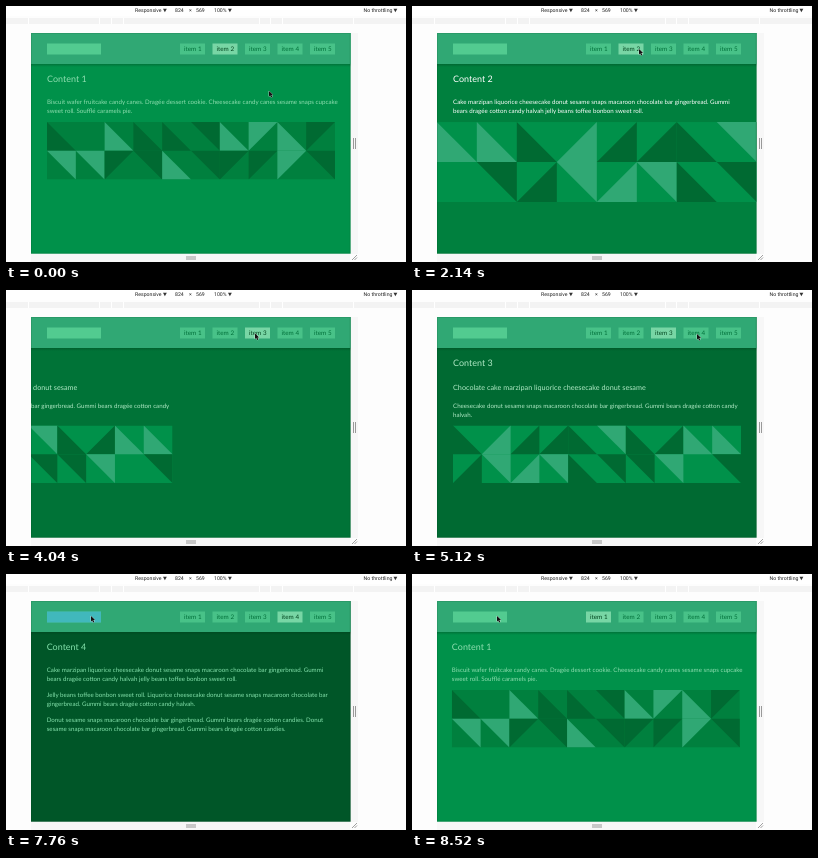
Recreate the animation shown at these times as an HTML page with a canvas. Size 400 px wide and 256 px high, loop 8.54 s.

```html
<!DOCTYPE html>
<html lang="en">
<head>
<meta charset="utf-8">
<title>Page transitions</title>
<style>
  html, body { margin: 0; width: 100%; height: 100%; overflow: hidden; background: #fff; }
  canvas { display: block; }
</style>
</head>
<body>
<canvas id="stage" width="400" height="256"></canvas>
<script>
const ctx = document.getElementById('stage').getContext('2d');
ctx.textRendering = 'geometricPrecision';
const LOOP = 8540, SLIDE = 840;
const VIEW = { x: 25, y: 27, w: 319.6, h: 220.7 };
const HEADER_H = 31, LEFT = 41, IMAGE_W = 288, IMAGE_H = 57.6;
const LIGHT = '#30a874', MID = '#00914a', BASE = '#00803e', DARK = '#006a32';

// Tiles: a-d fill the TL, TR, BR or BL corner; capitals use the light colour.
const tiles = ['cDDdCccdBd', 'B.bcBCBdbb'];
const shift = (rows, n) => rows.map(row => row.slice(n) + row.slice(0, n));
const halfTurn = rows => rows.map(row => [...row].reverse().map(code => {
  const i = 'abcdABCD'.indexOf(code);
  return i < 0 ? code : 'cdabCDAB'[i];
}).join('')).reverse();

const pages = [
  { bg: [0, 145, 74], ink: [142, 222, 176],
    lines: [[98, 'Biscuit wafer fruitcake candy canes. Dragée dessert cookie. Cheesecake candy canes sesame snaps cupcake'],
            [107, 'sweet roll. Soufflé caramels pie.']],
    image: { y: 116, base: BASE, rows: shift(halfTurn(tiles), 7) } },
  { bg: [0, 128, 62], ink: [255, 255, 255],
    lines: [[98, 'Cake marzipan liquorice cheesecake donut sesame snaps macaroon chocolate bar gingerbread. Gummi'],
            [107, 'bears dragée cotton candy halvah jelly beans toffee bonbon sweet roll.']],
    image: { y: 116, base: MID, rows: tiles } },
  { bg: [0, 106, 50], ink: [175, 233, 197],
    lines: [[99.5, 'Chocolate cake marzipan liquorice cheesecake donut sesame', 7.25],
            [118, 'Cheesecake donut sesame snaps macaroon chocolate bar gingerbread. Gummi bears dragée cotton candy'],
            [127, 'halvah.']],
    image: { y: 135.5, base: MID, rows: shift(tiles, 3) } },
  { bg: [0, 86, 40], ink: [132, 226, 172],
    lines: [[98, 'Cake marzipan liquorice cheesecake donut sesame snaps macaroon chocolate bar gingerbread. Gummi'],
            [107, 'bears dragée cotton candy halvah jelly beans toffee bonbon sweet roll.'],
            [123, 'Jelly beans toffee bonbon sweet roll. Liquorice cheesecake donut sesame snaps macaroon chocolate bar'],
            [132, 'gingerbread. Gummi bears dragée cotton candy halvah.'],
            [148, 'Donut sesame snaps macaroon chocolate bar gingerbread. Gummi bears dragée cotton candies. Donut'],
            [157, 'sesame snaps macaroon chocolate bar gingerbread. Gummi bears dragée cotton candies.']] }
];
const clicks = [
  { at: 500, from: 0, to: 1 },
  { at: 3580, from: 1, to: 2, tap: [239, 25] },
  { at: 5620, from: 2, to: 3, tap: [271.5, 25] },
  { at: 7760, from: 3, to: 0, tap: [41, 54] }
];
const moves = [
  [500, 800, 227, 43], [2220, 2580, 249, 43.5], [4920, 5120, 285, 44], [6480, 6760, 85, 42]
];

const clamp = v => Math.max(0, Math.min(1, v));
const mix = (a, b, k) => a + (b - a) * k;
const mixColor = (a, b, k) => `rgb(${a.map((v, i) => Math.round(mix(v, b[i], k)))})`;
const smooth = k => k * k * (3 - 2 * k);
const expoOut = k => k >= 1 ? 1 : 1 - 2 ** (-10 * k);
const expoIn = k => k <= 0 ? 0 : 2 ** (10 * k - 10);
const expoInOut = k => k < .5 ? expoIn(2 * k) / 2 : (1 + expoOut(2 * k - 1)) / 2;

function rect(x, y, w, h, color) {
  ctx.fillStyle = color;
  ctx.fillRect(x, y, w, h);
}

function poly(color, ...points) {
  ctx.fillStyle = color;
  ctx.beginPath();
  points.forEach(([x, y]) => ctx.lineTo(x, y));
  ctx.closePath();
  ctx.fill();
}

// Text is set large and scaled down so that small sizes keep true widths.
function text(str, x, y, size, color, font = 'Lato') {
  ctx.save();
  ctx.translate(x, y);
  ctx.scale(.1, .1);
  ctx.font = `${size * 10}px ${font}, sans-serif`;
  ctx.fillStyle = color;
  ctx.fillText(str, 0, 0);
  ctx.restore();
}

function drawToolbar() {
  rect(0, 0, 400, 256, '#fdfdfd');
  rect(0, 0, 400, 10, '#fff');
  [['Responsive', 129], ['824', 169], ['×', 183], ['569', 190], ['100%', 208], ['No throttling', 357.5]]
    .forEach(([label, x]) => text(label, x, 6.3, 5.2, '#222', 'Roboto'));
  [157, 222, 387.5].forEach(x => poly('#333', [x, 2.8], [x + 3.8, 2.8], [x + 1.9, 6.2]));
  rect(0, 12, 400, 6, '#f3f3f3');
  [22, 93, 105, 117, 253, 264, 276, 347].forEach(x => rect(x, 12, 1, 6, '#fff'));
}

function drawHandles() {
  rect(344.5, 27, 7.5, 221, '#f7f7f7');
  rect(25, 248, 319, 8, '#f7f7f7');
  [347, 349].forEach(x => rect(x, 132, 1, 11, '#999'));
  [250.5, 252.5].forEach(y => rect(180, y, 10, 1, '#999'));
  ctx.strokeStyle = '#777';
  ctx.lineWidth = .7;
  ctx.beginPath();
  ctx.moveTo(346, 254); ctx.lineTo(351, 249);
  ctx.moveTo(348.5, 254); ctx.lineTo(351, 251.5);
  ctx.stroke();
}

function drawImage({ base, rows }, x, y, w, h) {
  const tile = Math.max(w / 10, h / 2);
  ctx.save();
  ctx.beginPath();
  ctx.rect(x, y, w, h);
  ctx.clip();
  rect(x, y, w, h, base);
  ctx.translate(x + w / 2 - 5 * tile, y + h / 2 - tile);
  rows.forEach((row, r) => [...row].forEach((code, c) => {
    if (code === '.') return;
    const skip = ('abcd'.indexOf(code.toLowerCase()) + 2) % 4;
    const corners = [[0, 0], [1, 0], [1, 1], [0, 1]].filter((_, i) => i !== skip);
    poly(code < 'a' ? LIGHT : DARK, ...corners.map(([u, v]) => [(c + u) * tile, (r + v) * tile]));
  }));
  ctx.restore();
}

function drawPage(index, offset, t) {
  const { ink, lines, image } = pages[index];
  // The second page settles and its picture grows to full width.
  const k = index === 1 ? expoInOut(clamp((t - 1360) / SLIDE)) : 1;
  const color = mixColor([190, 233, 206], ink, k);
  const dy = 9 * (1 - k);
  ctx.save();
  ctx.beginPath();
  ctx.rect(VIEW.x, VIEW.y + HEADER_H, VIEW.w, VIEW.h - HEADER_H);
  ctx.clip();
  ctx.translate(offset, 0);
  text('Content ' + (index + 1), LEFT + 39 * (1 - k), 76 + dy, 9, color);
  lines.forEach(([y, str, size = 6.19]) => text(str, LEFT + 45 * (1 - k), y + dy, size, color));
  if (index === 1) {
    drawImage(image, mix(40, VIEW.x, k), mix(148, image.y, k), mix(289, VIEW.w, k), mix(IMAGE_H, 80, k));
  } else if (image) {
    drawImage(image, LEFT, image.y, IMAGE_W, IMAGE_H);
  }
  ctx.restore();
}

function drawHeader(active, click, elapsed) {
  const { x, y, w } = VIEW;
  const shade = ctx.createLinearGradient(0, y + HEADER_H, 0, y + HEADER_H + 3);
  shade.addColorStop(0, 'rgba(0,50,20,.3)');
  shade.addColorStop(1, 'rgba(0,50,20,0)');
  rect(x, y + HEADER_H, w, 3, shade);
  rect(x, y, w, HEADER_H, LIGHT);
  rect(41, 37.5, 54, 11, '#52cb90');
  for (let i = 0; i < 5; i++) {
    const left = 174 + i * 32.5;
    rect(left, 37.5, 25, 11, i === active ? '#78d6a5' : '#48c288');
    text('item ' + (i + 1), left + 4, 45.3, 6.3, i === active ? '#00451f' : '#00703a');
  }
  if (click && click.tap && elapsed < 300) {
    rect(click.tap[0], 37.5, click.tap[1], 11, 'rgba(51,170,225,.55)');
  }
}

function drawCursor(t) {
  let x = 263, y = 85;
  for (const [start, end, toX, toY] of moves) {
    const k = smooth(clamp((t - start) / (end - start)));
    x = mix(x, toX, k);
    y = mix(y, toY, k);
  }
  const arrow = [[0, 0], [0, 5.4], [1.3, 4.3], [2.2, 6.4], [3.2, 6], [2.3, 4], [4, 3.9]];
  ctx.save();
  ctx.translate(x, y);
  ctx.strokeStyle = 'rgba(255,255,255,.7)';
  ctx.lineWidth = .8;
  poly('#111', ...arrow);
  ctx.stroke();
  poly('#111', ...arrow);
  ctx.restore();
}

function draw(t) {
  const click = clicks.filter(c => c.at <= t).pop();
  const elapsed = click ? t - click.at : 0;
  const half = SLIDE / 2;
  let page = 0, offset = 0, bg = `rgb(${pages[0].bg})`;
  if (click) {
    const leaving = elapsed < half;
    page = leaving ? click.from : click.to;
    offset = -VIEW.w * (leaving ? expoIn(elapsed / half) : 1 - expoOut((elapsed - half) / half));
    bg = mixColor(pages[click.from].bg, pages[click.to].bg, clamp((elapsed - 210) / half));
  }
  drawToolbar();
  drawHandles();
  rect(VIEW.x, VIEW.y, VIEW.w, VIEW.h, bg);
  drawPage(page, offset, t);
  drawHeader(t < 920 ? 1 : page, click, elapsed);
  ctx.strokeStyle = 'rgba(0,50,20,.12)';
  ctx.lineWidth = 1;
  ctx.strokeRect(VIEW.x + .5, VIEW.y + .5, VIEW.w - 1, VIEW.h - 1);
  drawCursor(t);
}

const began = performance.now();
function tick() {
  draw((performance.now() - began) % LOOP);
  requestAnimationFrame(tick);
}
tick();
</script>
</body>
</html>
```
